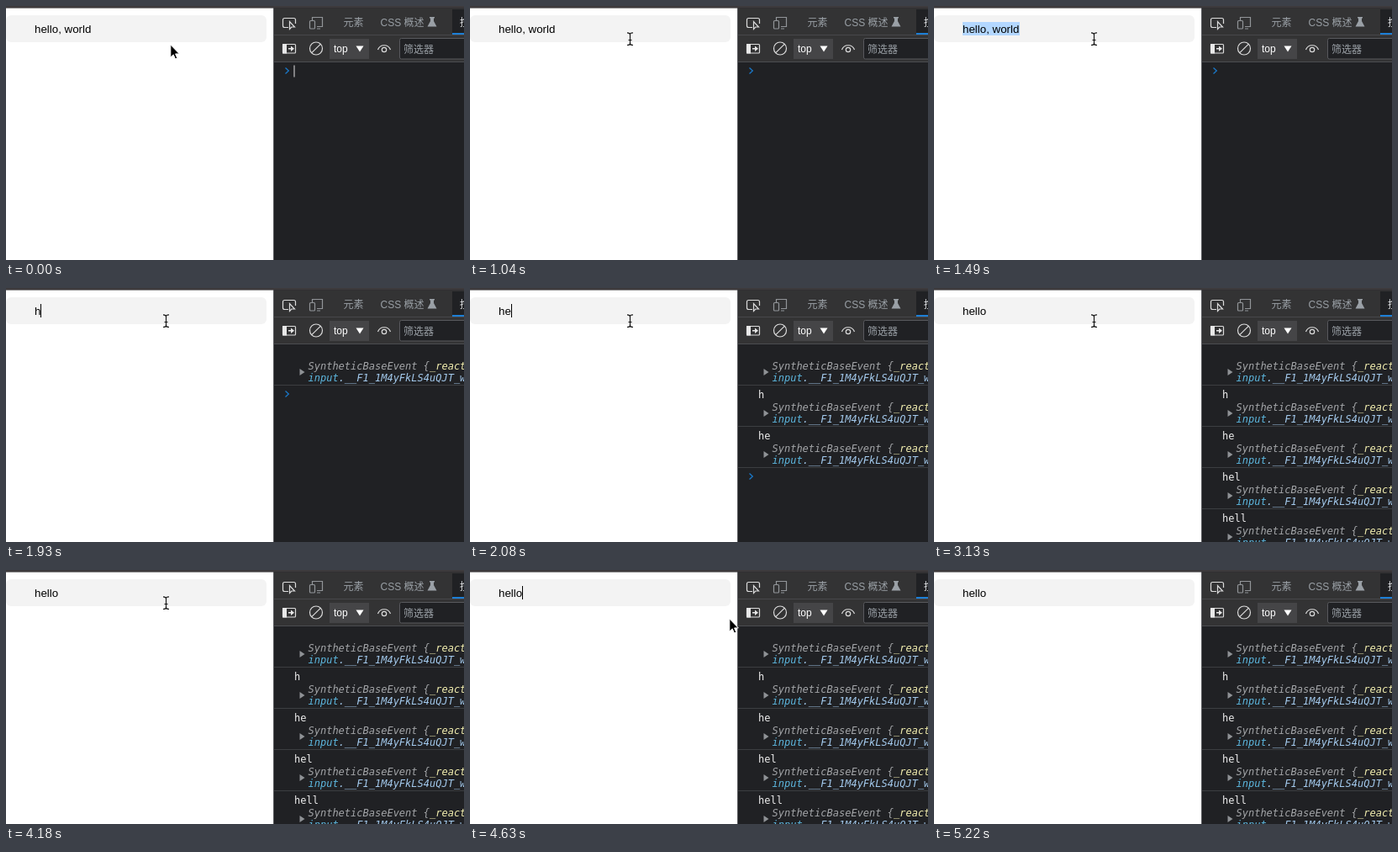
These frames come from a looping animation (545 by 302 pixels, 5360 ms). An HTML page:

```html
<!DOCTYPE html>
<html lang="zh-CN">
<head>
<meta charset="utf-8">
<style>
  html, body { margin: 0; width: 100%; height: 100%; overflow: hidden; background: #fff; }
  svg { display: block; width: 545px; height: 302px; }
  text { font: 12px "Liberation Sans", "Noto Sans CJK SC", "Noto Sans CJK", sans-serif; white-space: pre; }
  #field { font-size: 13.333px; }
  .mono text { font: 12px "DejaVu Sans Mono", monospace; }
  .mono .event { font-style: italic; }
  .line { fill: none; stroke: #dcdcdc; stroke-width: 1.2; }
  .dim { stroke: #929599; }
</style>
</head>
<body>
<svg viewBox="0 0 545 302">
  <rect width="545" height="302" fill="#fff"/>
  <rect y="11" width="310" height="32" rx="6" fill="#f3f3f3"/>
  <rect id="selection" x="34" y="19" width="68" height="16" fill="#b3d7ff"/>
  <text id="field" x="34" y="31.5"></text>
  <rect id="caret" y="19" width="1" height="16"/>

  <!-- developer tools -->
  <rect x="318" width="227" height="302" fill="#202124"/>
  <rect x="319" y="3" width="226" height="63" fill="#333334"/>
  <rect x="318" y="2" width="1" height="300" fill="#55565a"/>
  <rect x="319" y="34" width="226" height="1" fill="#47484b"/>
  <rect x="319" y="66" width="226" height="1" fill="#4b4c50"/>
  <rect width="545" height="2.6" fill="#3d3a3c"/>

  <path class="line" d="M336 25.5H331.5Q329.500 25.500 329.500 23.500V16.500Q329.500 14.500 331.500 14.500H342.500Q344.500 14.500 344.500 16.500V21"/>
  <path class="line" d="M337.500 18.500V27.500L339.800 25H343.500Z"/>
  <g class="line dim">
    <path d="M364.500 17V13.500H376.500V24.500H370M370 27H374"/>
    <rect x="361.500" y="17.500" width="6" height="9.500" rx="1"/>
  </g>
  <g fill="#9aa0a6">
    <text x="401.500" y="24">元素</text>
    <text x="445.500" y="24">CSS 概述</text>
    <path d="M504 13H510V14.500H509V18L512.500 24.500H501.500L505 18V14.500H504Z"/>
  </g>
  <rect x="531" y="4" width="14" height="28" fill="#202124"/>
  <rect x="531" y="32" width="14" height="2" fill="#1d7fd6"/>
  <text x="540" y="24" fill="#e8eaed">控制台</text>

  <rect class="line" x="329.500" y="45.500" width="15" height="10.500" rx="1"/>
  <path fill="#e8e8e8" d="M329 45H334V56.500H329ZM336 50H339V47.500L343 50.800L339 54V51.600H336Z"/>
  <circle class="line" cx="369" cy="50.500" r="7.500"/>
  <path class="line" d="M363.800 55.700L374.200 45.300"/>
  <rect x="385" y="39" width="47" height="24" fill="#454547"/>
  <text x="390" y="55" fill="#fff">top</text>
  <path fill="#fff" d="M416.500 47.500H425.500L421 54.500Z"/>
  <path class="line" d="M442.500 52C445 45 455 45 457.500 52"/>
  <circle class="line" cx="450" cy="52" r="2.700"/>
  <rect x="468.500" y="38.500" width="90" height="24.500" rx="2" fill="#202124" stroke="#58595d"/>
  <text x="473" y="55.500" fill="#9aa0a6">筛选器</text>

  <g id="log" class="mono"></g>
  <g id="prompt">
    <path d="M332.500 6.500L336.300 10L332.500 13.500" fill="none" stroke="#1a78c8" stroke-width="1.300"/>
    <rect id="promptCaret" x="342.500" y="3.500" width="1" height="14" fill="#e0e0e0"/>
  </g>

  <path id="arrow" d="M.8 1V16L4.200 12.800L6.500 18L8.800 17L6.600 11.900H11.300Z" stroke="#fff" stroke-width="1"/>
  <g id="beam" fill="none">
    <path id="beamShape" stroke="#fff" stroke-width="2.600" stroke-opacity=".8" d="M0 .8Q3.500 .8 3.500 3Q3.500 .8 7 .8M3.500 2.500V14M0 15.500Q3.500 15.500 3.500 13.500Q3.500 15.500 7 15.500M1.500 9.500H5.500"/>
    <use href="#beamShape"/>
    <path stroke="#111" stroke-width="1.200" d="M0 .8Q3.500 .8 3.500 3Q3.500 .8 7 .8M3.500 2.500V14M0 15.500Q3.500 15.500 3.500 13.500Q3.500 15.500 7 15.500M1.500 9.500H5.500"/>
  </g>
</svg>
<script>
const LOOP = 5360, ENTRY_HEIGHT = 49, LOG_TOP = 67;
const GREETING = 'hello, world', PLACEHOLDER = '请输入';
const $ = id => document.getElementById(id);

// [start, value, caret visible]
const typing = [
  [0, GREETING, false], [590, GREETING, true], [1040, GREETING, false],
  [1640, '', true], [1930, 'h', true], [2080, 'he', true], [2230, 'hel', true],
  [2380, 'hell', true], [2680, 'hello', true], [3130, 'hello', false],
  [3580, 'hello', true], [4180, 'hello', false], [4630, 'hello', true],
  [5070, 'hello', false]
];
// [start, shape, x, y]
const pointer = [
  [0, 'arrow', 195, 45], [140, 'beam', 188, 34], [290, 'beam', 187, 31],
  [4630, 'arrow', 308, 57], [4770, 'arrow', 478, 177],
  [4920, 'arrow', 507.5, 284], [5070, 'arrow', 508, 301], [5220, 'none', 0, 0]
];
// [start, number of entries]
const logging = [[0, 0], [1640, 1], [2080, 3], [2230, 4], [2380, 5]];

const current = (steps, t) => steps.findLast(step => step[0] <= t);
const show = (id, on) => { $(id).style.display = on ? '' : 'none'; };
const moveTo = (id, x, y) => $(id).setAttribute('transform', `translate(${x} ${y})`);

$('log').innerHTML = ['', 'h', 'he', 'hel', 'hell'].map((value, i) => `
  <g transform="translate(0 ${LOG_TOP + i * ENTRY_HEIGHT})">
    <text x="343" y="15" fill="#eee">${value}</text>
    <path d="M349.500 29L355.500 33L349.500 37Z" fill="#8f9296"/>
    <text class="event" x="359.500" y="29.500" fill="#a3a5a8">SyntheticBaseEvent {<tspan fill="#f3efb0">_reactName</tspan></text>
    <text class="event" x="359.500" y="43.500" fill="#5db8e0">input<tspan fill="#a3c9ec">.__F1_1M4yFkLS4uQJT_w</tspan></text>
    <rect x="319" y="${ENTRY_HEIGHT - 1}" width="226" height="1" fill="#3c3e41"/>
  </g>`).join('');
const entries = [...$('log').children];

function draw(t) {
  const [, value, caretOn] = current(typing, t);
  const field = $('field');
  field.textContent = value;
  $('caret').setAttribute('x', Math.round(34 + (value && field.getComputedTextLength())));
  show('caret', caretOn);
  if (!value) field.textContent = PLACEHOLDER;
  field.setAttribute('fill', value ? '#000' : '#757575');
  show('selection', t >= 1490 && t < 1640);

  const [, count] = current(logging, t);
  entries.forEach((entry, i) => { entry.style.display = i < count ? '' : 'none'; });
  moveTo('prompt', 0, LOG_TOP + count * ENTRY_HEIGHT);
  show('promptCaret', t < 140);

  const [, shape, x, y] = current(pointer, t);
  for (const id of ['arrow', 'beam']) {
    show(id, id === shape);
    moveTo(id, x, y);
  }
}

const start = performance.now();
function tick() {
  draw((performance.now() - start) % LOOP);
  requestAnimationFrame(tick);
}
tick();
</script>
</body>
</html>
```
